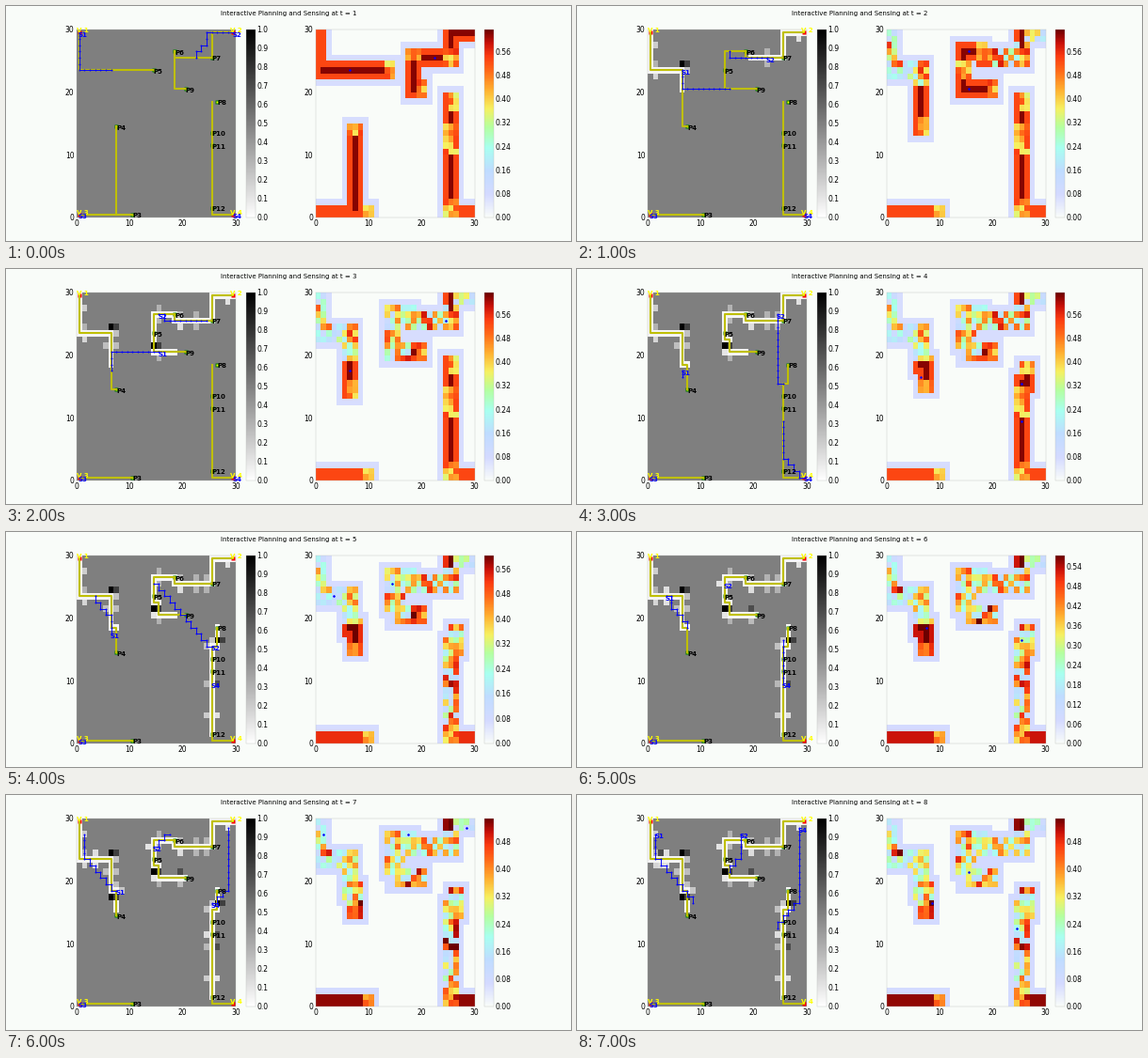
A matplotlib script that plays this animation: 600 by 250 pixels, repeating every 8 s.

```python
import numpy as np
import matplotlib.pyplot as plt
from matplotlib.animation import FuncAnimation
from matplotlib.colors import LinearSegmentedColormap

N, STEPS = 30, 8
PAPER = "#f9fcf9"
plt.rcParams.update({
    "font.family": "DejaVu Sans", "font.size": 10,
    "xtick.labelsize": 11, "ytick.labelsize": 11,
    "axes.linewidth": 0.5, "axes.edgecolor": "#b8bab8",
    "xtick.major.size": 0, "ytick.major.size": 0,
    "xtick.major.pad": 3.5, "ytick.major.pad": 3.5,
})

HEAT = LinearSegmentedColormap.from_list("heat", [
    (0, PAPER), (0.12, "#d4daff"), (0.25, "#bfdcff"), (0.37, "#a8fff0"),
    (0.48, "#b4ffa0"), (0.58, "#f6f060"), (0.68, "#ffb030"),
    (0.78, "#ff6a18"), (0.86, "#fb3a10"), (0.93, "#c81008"), (1, "#6c0000")])

PLACES = {3: (10.5, 0.5), 4: (7.5, 14.5), 5: (14.5, 23.5), 6: (18.5, 26.5),
          7: (25.5, 25.5), 8: (26.5, 18.5), 9: (20.5, 20.5),
          10: (25.5, 13.5), 11: (25.5, 11.5), 12: (25.5, 1.5)}
CORNERS = [(0.5, 29.5), (29.5, 29.5), (0.5, 0.5), (29.5, 0.5)]
WALLS = [(6, 24), (6, 17), (14, 21), (26, 16)]

# Way points of each moving sensor, one plan per step; a plan starts
# where the sensor stands
PLANS = {
    1: [[(0.5, 29.5), (0.5, 23.5), (6.5, 23.5)],
        [(6.5, 23.5), (6.5, 20.5), (15.5, 20.5)],
        [(15.5, 20.5), (6.5, 20.5), (6.5, 17.5)],
        [(6.5, 17.5), (6.5, 16.5)],
        [(6.5, 17.5), (6.5, 20.5), (3.5, 23.5)],
        [(3.5, 23.5), (7.5, 18.5)],
        [(7.5, 18.5), (1.5, 24.5), (1.5, 27.5)],
        [(1.5, 27.5), (1.5, 23.5), (8.5, 16.5)]],
    2: [[(29.5, 29.5), (25.5, 29.5), (22.5, 25.5)],
        [(22.5, 25.5), (15.5, 25.5), (15.5, 26.5)],
        [(15.5, 26.5), (18.5, 25.5), (24.5, 25.5)],
        [(24.5, 26.5), (24.5, 15.5), (25.5, 15.5)],
        [(25.5, 15.5), (14.5, 25.5)],
        [(14.5, 25.5)],
        [(14.5, 25.5), (17.5, 27.5)],
        [(17.5, 27.5), (17.5, 23.5), (15.5, 21.5)]],
    4: [[(29.5, 0.5)]] * 3 + [
        [(29.5, 0.5), (25.5, 3.5), (25.5, 9.5)],
        [(25.5, 9.5)],
        [(25.5, 9.5), (25.5, 16.5)],
        [(25.5, 16.5), (28.5, 18.5), (28.5, 28.5)],
        [(28.5, 28.5), (28.5, 16.5), (24.5, 12.5)]],
}


def routes(t):
    """Planned corridors joining the places at step t."""
    out = [[(0.5, 0.5), (10.5, 0.5)],
           [(25.5, 18.5), (25.5, 0.5), (29.5, 0.5)],
           [(18.5, 26.5), (18.5, 25.5), (25.5, 25.5), (25.5, 29.5), (29.5, 29.5)]]
    if t == 1:
        return out + [[(0.5, 29.5), (0.5, 23.5), (14.5, 23.5)],
                      [(18.5, 26.5), (18.5, 20.5), (20.5, 20.5)],
                      [(7.5, 14.5), (7.5, 0.5)]]
    late = t >= 4
    if late:
        out[1] = [(26.5, 18.5), (26.5, 15.5)] + [(25.5, 15.5)] + out[1][1:]
    west = [(0.5, 29.5), (0.5, 23.5), (6.5, 23.5)]
    west += [(6.5, 18.5), (7.5, 18.5)] if late else [(6.5, 14.5)]
    mid = [(18.5, 26.5), (14.5, 26.5)]
    mid += [(14.5, 22.5), (15.5, 22.5), (15.5, 20.5)] if late else [(14.5, 20.5)]
    return out + [west + [(7.5, 14.5)], mid + [(20.5, 20.5)]]


def walk(points):
    """Unit steps along a polyline; slanted parts become stairs."""
    x, y = points[0]
    out = [(x, y)]
    for px, py in points[1:]:
        nx, ny = abs(px - x), abs(py - y)
        while (x, y) != (px, py):
            if abs(px - x) * ny >= abs(py - y) * nx and x != px:
                x += np.sign(px - x)
            else:
                y += np.sign(py - y)
            out.append((x, y))
    return np.array(out)


def distance(cells):
    """Chebyshev distance of every grid cell to the nearest given cell."""
    gy, gx = np.mgrid[:N, :N]
    d = np.full((N, N), 99)
    for cx, cy in cells:
        d = np.minimum(d, np.maximum(abs(gx - int(cx)), abs(gy - int(cy))))
    return d


def trimmed(route):
    """Cells of a route without its end at a place of interest."""
    cells = walk(route)
    spots = set(PLACES.values())
    return cells[int(route[0] in spots):len(cells) - int(route[-1] in spots)]


def fields(t):
    """Occupancy belief and information value at step t."""
    noise = np.random.default_rng(7).random((N, N))
    path = distance(np.vstack([walk(r) for r in routes(t)]))
    d = distance(np.vstack([trimmed(r) for r in routes(t)]))

    belief = np.full((N, N), 0.5)
    value = np.select([d == 0, d == 1, d == 2], [0.62, 0.53, 0.07], 0.0)
    value[0] = np.minimum(value[0], 0.53)
    value[:, 0] = np.minimum(value[:, 0], 0.53)
    known = (distance(PLACES.values()) <= 1) & (d <= 1)
    value[known] = 0.34 + 0.22 * noise[known]

    # Sensors look around at the end of a plan and every fifth cell before it
    for s in range(1, t):
        cells = [c for plans in PLANS.values() if len(plans[s - 1]) > 1
                 for c in walk(plans[s - 1])[::-5]]
        cells = [(int(x), int(y)) for x, y in cells if path[int(y), int(x)] == 0]
        near = distance(cells)
        belief[(near <= 3) & (path == 0)] = 0.04
        for x, y in cells:
            for dx, dy in ((1, 0), (-1, 0), (0, 1), (0, -1)):
                i, j = min(max(y + dy, 0), N - 1), min(max(x + dx, 0), N - 1)
                if path[i, j]:
                    n = noise[i, j]
                    belief[i, j] = 0.1 + 0.25 * n if n < 0.85 else 0.7
        for x, y in WALLS:
            if near[y, x] <= 1:
                belief[y, x:x + 2] = 1, 0.75
        seen = (near <= 2) & (d <= 1)
        value[seen] = (0.1 + 0.48 * noise[seen]) * 0.92 ** (t - s - 1)
    return belief, value


fig, (left, right) = plt.subplots(1, 2, figsize=(12, 5), dpi=50, facecolor=PAPER)
fig.subplots_adjust(left=0.125, right=0.9, bottom=0.1, top=0.9, wspace=0.2)
title = fig.suptitle("", fontsize=10)
edges = np.arange(N + 1)
blank = np.zeros((N, N))
gray = left.pcolormesh(edges, edges, blank, cmap="gray_r", vmin=0, vmax=1)
heat = right.pcolormesh(edges, edges, blank, cmap=HEAT)
for ax in (left, right):
    ax.set(xlim=(0, N), ylim=(0, N), xticks=range(0, 31, 10),
           yticks=range(0, 31, 10))
gray_bar = fig.colorbar(gray, ax=left, ticks=np.arange(11) / 10, format="%.1f")
heat_bar = fig.colorbar(heat, ax=right, format="%.2f")
for bar in (gray_bar, heat_bar):
    bar.ax.tick_params(pad=2)


def label(x, y, text, color, z):
    return left.text(x, y, text, color=color, weight="bold", zorder=z)


left.plot(*zip(*CORNERS), "rs", ms=7, mec="none", zorder=3)
left.plot(*zip(*PLACES.values()), "gs", ms=7, mec="none", zorder=3)
left.plot(*zip(*PLACES.values()), "s", color="yellow", ms=4, mec="none", zorder=4)
for i, (x, y) in enumerate(CORNERS, 1):
    label(x - 0.5, y, f"V {i}", "yellow", 7)
for i, (x, y) in PLACES.items():
    label(x, y - 0.5, f"P{i}", "black", 8)

yellow = [left.plot([], [], color="#bfbf00", lw=3, zorder=5)[0] for _ in range(6)]
blue = {i: left.plot([], [], "b.-", lw=1.3, ms=3.5, zorder=6)[0] for i in PLANS}
names = {i: label(x - 0.2, y - 0.7, f"S{i}", "blue", 9)
         for i, (x, y) in enumerate(CORNERS, 1)}
goals, = right.plot([], [], "b.", ms=5)


def draw(frame):
    t = frame + 1
    title.set_text(f"Interactive Planning and Sensing at t = {t}")
    belief, value = fields(t)
    gray.set_array(belief)
    heat.set_array(value)
    vmax = np.clip(0.633 - 0.03 * (t - 4), 0.547, 0.633)
    heat.set_clim(0, vmax)
    heat_bar.set_ticks(np.arange(0, vmax, 0.06 if t == 6 else 0.08))

    paths = routes(t)
    for i, line in enumerate(yellow):
        line.set_data(*(zip(*paths[i]) if i < len(paths) else ([], [])))
    ends = []
    for i, line in blue.items():
        plan = PLANS[i][frame]
        x, y = plan[0]
        names[i].set_position((x - 0.2, y - 0.7))
        moving = len(plan) > 1
        line.set_data(walk(plan).T if moving else ([], []))
        if moving:
            ends.append(plan[-1])
    goals.set_data(*zip(*ends))
    return []


anim = FuncAnimation(fig, draw, frames=STEPS, interval=1000, repeat=True,
                     repeat_delay=0, blit=False)
plt.show()
```
